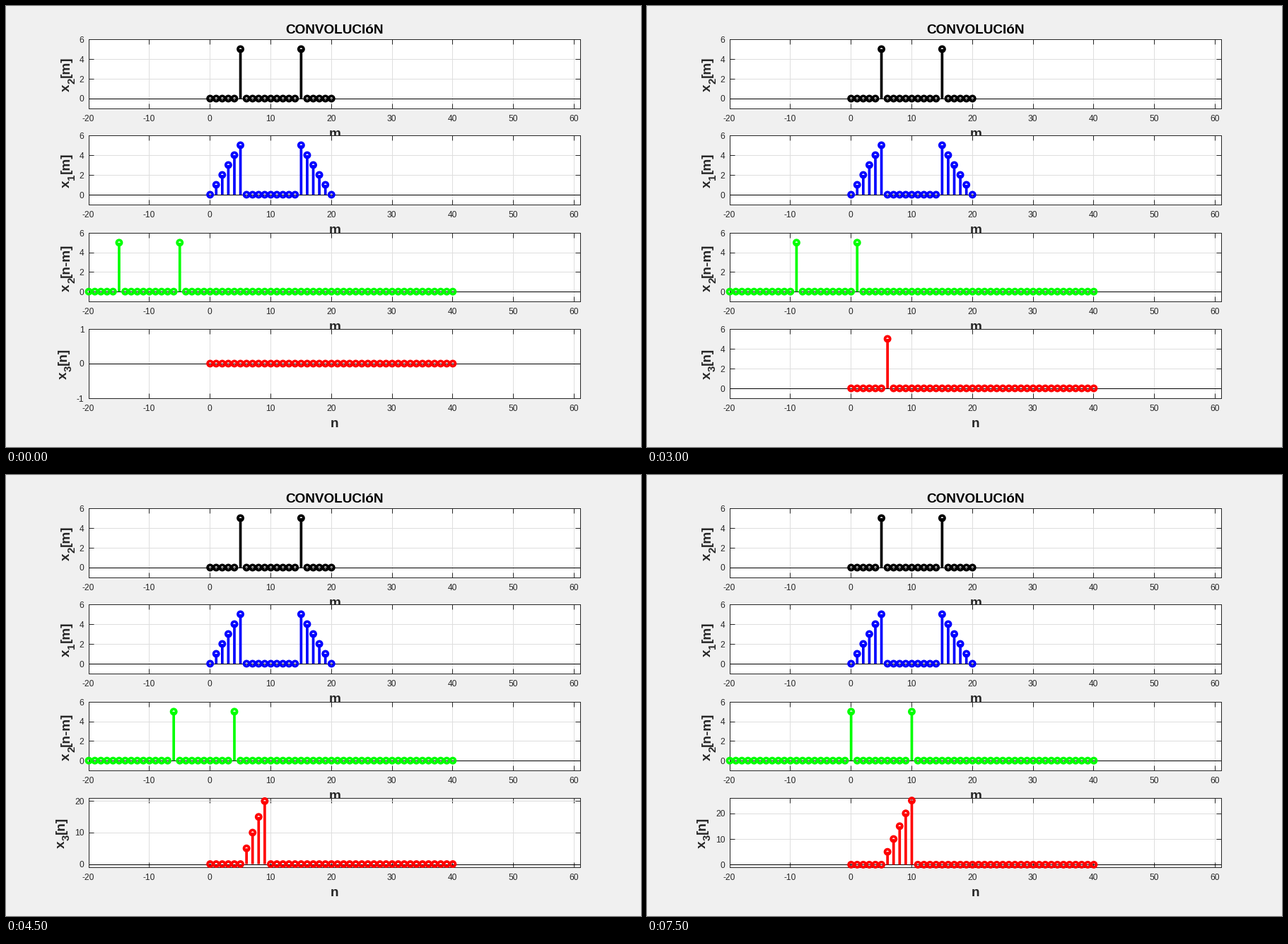
Recreate the animation shown at these times as a matplotlib script. Size 898x624 px, loop 8000 ms.

```python
import numpy as np
import matplotlib.pyplot as plt
from matplotlib.animation import FuncAnimation
from matplotlib.transforms import Affine2D, ScaledTranslation

W, H, DPI = 898, 624, 64
PX = 72 / DPI  # points per pixel
LEFT, RIGHT = 116.55, 811.55
CENTER = 465
INK, GRID = "#262626", "#dedede"
FRAMES, STEP_MS = 16, 500

plt.rcParams.update({
    "font.family": "Liberation Sans",
    "axes.unicode_minus": False,
    "axes.edgecolor": INK,
    "axes.linewidth": PX,
})

fig = plt.figure(figsize=(W / DPI, H / DPI), dpi=DPI, facecolor="#f0f0f0")
pixels = Affine2D().scale(1 / DPI) + fig.dpi_scale_trans
half_pixel = ScaledTranslation(0.5 / DPI, 0, fig.dpi_scale_trans)


def put(ax, x, y, s, size=19, color=INK, **kw):
    """Bold text with its baseline at a pixel position."""
    return ax.text(x, y, s, transform=pixels, fontsize=size * PX, color=color,
                   weight="bold", va="baseline", **kw)


def side_label(ax, base, middle, sub, rest):
    """Rotated 'x' with a subscript, centred on a height."""
    parts, y = [], 0
    for s, size, drop in (("x", 19, 0), (sub, 15, 7), (rest, 19, 0)):
        t = put(ax, base + drop, y, s, size, rotation=90,
                rotation_mode="anchor", ha="left")
        parts.append((t, drop))
        y += t.get_window_extent().height + 0.5
    for t, _ in parts:
        t.set_y(t.get_position()[1] + middle - y / 2)
    return parts


def scale_y(ax, peak):
    lo, hi = -1, peak + 1
    step = next(s for s in (1, 2, 5, 10) if s * 98 / (hi - lo) >= 25)
    ticks = np.arange(int(np.ceil(lo / step)) * step, hi + 1, step)
    ticks = ticks[ticks <= hi]
    ax.set_yticks(ticks, [str(t) for t in ticks])
    ax.set_ylim(lo, hi)


def panel(top, bottom, sub, rest, xlabel):
    y0, y1 = H - bottom, H - top
    ax = fig.add_axes([LEFT / W, y0 / H, (RIGHT - LEFT) / W, (y1 - y0) / H])
    ax.set_axisbelow(True)
    ax.grid(color=GRID, linewidth=PX)
    ax.tick_params(direction="in", top=True, right=True, length=7 * PX,
                   width=PX, color=INK, labelcolor=INK, labelsize=12 * PX)
    ax.tick_params(axis="x", pad=18 * PX)
    ax.tick_params(axis="y", pad=6 * PX)
    marks = range(-20, 61, 10)
    ax.set_xticks(marks, [str(m) for m in marks])
    ax.set_xlim(-20, 61)
    for t in ax.get_xticklabels():
        t.set_va("baseline")
    ax.axhline(0, color="black", linewidth=PX, zorder=2)
    put(ax, CENTER, y0 - 41, xlabel, ha="center")
    return ax, side_label(ax, 90, (y0 + y1) / 2, sub, rest)


class Stem:
    def __init__(self, ax, x, y, color):
        self.x = x
        place = ax.transData + half_pixel
        self.lines = ax.vlines(x, 0, y, color=color, linewidth=3.7 * PX,
                               transform=place, zorder=2.2)
        self.lines.set_snap(False)
        # one size per dot keeps them at sub-pixel positions
        sizes = np.full(len(x), (7.2 * PX) ** 2)
        self.dots = ax.scatter(x, y, s=sizes, facecolors="none", edgecolors=color,
                               linewidths=3.7 * PX, transform=place,
                               clip_on=False, zorder=3)

    def set(self, y):
        self.lines.set_segments([[(a, 0), (a, b)] for a, b in zip(self.x, y)])
        self.dots.set_offsets(np.column_stack([self.x, y]))


n = np.arange(21)
x1 = np.where(n <= 5, n, np.where(n >= 15, 20 - n, 0))
x2 = np.where((n == 5) | (n == 15), 5, 0)
x3 = np.convolve(x1, x2)
out = np.arange(41)
m = np.arange(-20, 41)

ax_a, _ = panel(47, 145, "2", "[m]", "m")
ax_b, _ = panel(183, 281, "1", "[m]", "m")
ax_c, _ = panel(321, 418, "2", "[n-m]", "m")
ax_d, out_label = panel(457, 555, "3", "[n]", "n")
put(ax_a, CENTER, 585, "CONVOLUCIóN", color="black", ha="center")

Stem(ax_a, n, x2, "black")
Stem(ax_b, n, x1, "blue")
flipped = Stem(ax_c, m, 0 * m, "lime")
result = Stem(ax_d, out, 0 * out, "red")
for ax in (ax_a, ax_b, ax_c, ax_d):
    ax.set_xlim(-20, 61)
    scale_y(ax, 5)


def update(k):
    flipped.set(np.where((k - m == 5) | (k - m == 15), 5, 0))
    y = np.where(out <= k, x3, 0)
    result.set(y)
    peak = int(y.max())
    scale_y(ax_d, peak)
    # wider tick labels push the side label out
    shift = 4 if peak == 0 else 7 if peak >= 10 else 0
    for t, drop in out_label:
        t.set_x(90 - shift + drop)
    return []


anim = FuncAnimation(fig, update, frames=FRAMES, interval=STEP_MS,
                     repeat=True, repeat_delay=0, blit=False)
plt.show()
```
